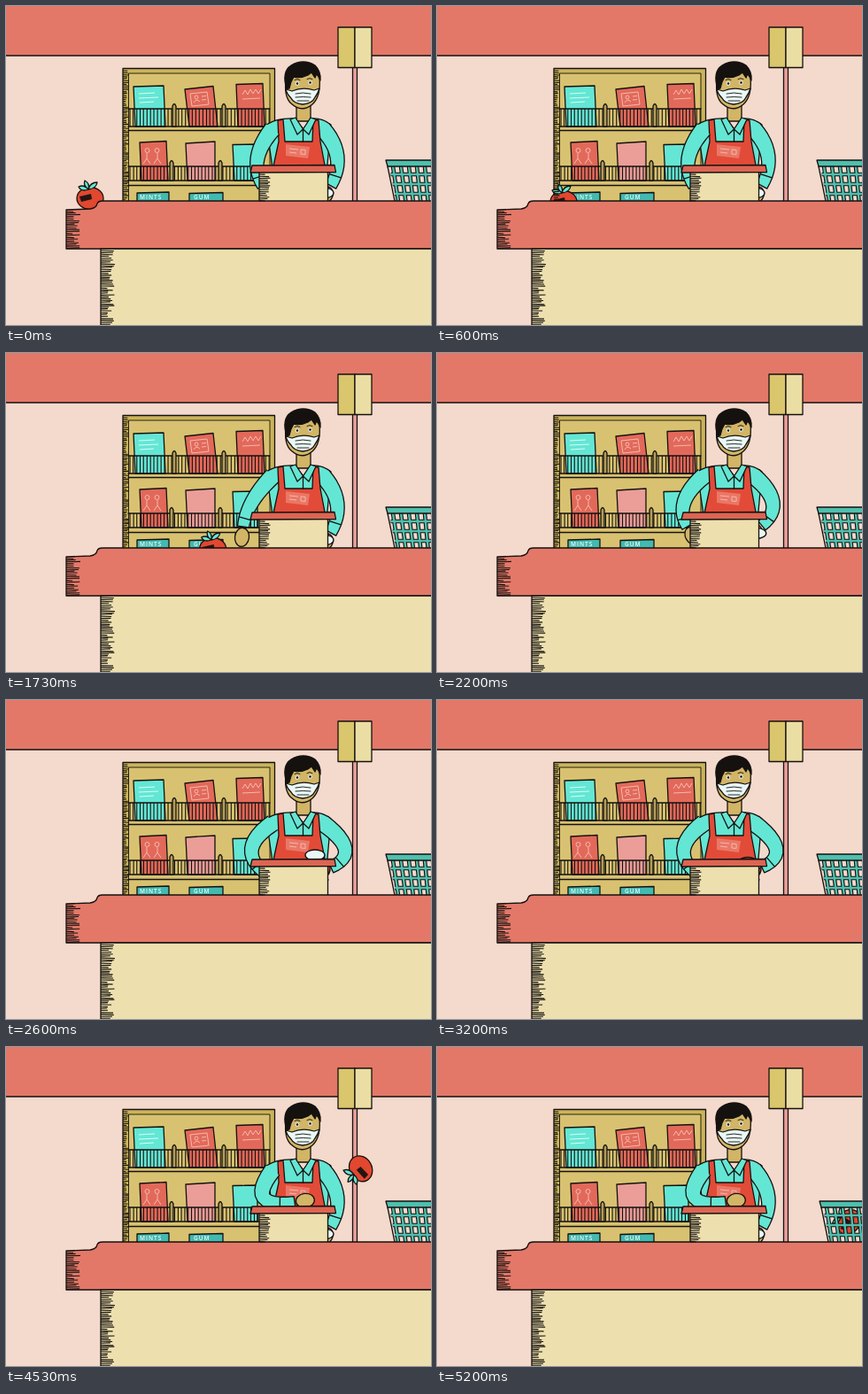
Recreate the animation shown at these times as an HTML page. Size 480 px wide and 360 px high, loop 5990 ms.

```html
<!DOCTYPE html>
<html lang="en">
<head>
<meta charset="utf-8">
<title>Checkout counter</title>
<style>
  html, body { margin: 0; width: 100%; height: 100%; overflow: hidden; background: #f4d9cd; }
  svg { display: block; width: 100vw; height: 100vh; }
  .ink { stroke: #15110f; stroke-width: 1.3; stroke-linejoin: round; stroke-linecap: round; }
  .line { fill: none; }
  .fine { stroke-width: 0.9; }
  .hatch { fill: none; stroke: #15110f; stroke-width: 1.1; }
  .chalk { fill: none; stroke: #f3b9ad; stroke-width: 1; }
  .red { fill: #e37868; }
  .poster { fill: #e2695a; }
  .tan { fill: #d8c271; }
  .cream { fill: #ede0ae; }
  .teal { fill: #64e6d4; }
  .skin { fill: #d2b566; }
  .apple { fill: #e2472f; }
  .apron { fill: #e24b38; }
  .white { fill: #e9f8f6; }
  .sign { font: 600 6.5px "Open Sans", sans-serif; letter-spacing: 1px; fill: #effdf8; }
</style>
</head>
<body>
<svg viewBox="0 0 480 360" preserveAspectRatio="none">
  <rect width="480" height="360" fill="#f4d9cd"/>
  <path class="ink red" d="M-2 -2H482V56H-2Z"/>

  <g id="shelf">
    <path class="ink" fill="#cbb45a" d="M132 70.500H303.500V222H132Z"/>
    <path class="ink tan fine" d="M138.500 222V76H298V222"/>
    <path class="ink teal" d="M144 91L178 90L180 136H146Z"/>
    <path class="ink poster" d="M202 94L234 90.500L239 136H207Z"/>
    <path class="ink poster" d="M260 88.500L290 87.500L292 136H262Z"/>
    <path class="ink poster" d="M151 154L181 152.500L183 197H153Z"/>
    <path class="ink" fill="#eb9d98" d="M203 155L236 153L236 197H205Z"/>
    <path class="ink teal" d="M256 156.500L284 156V197H258Z"/>
    <path class="chalk" style="stroke:#d6fff6" d="M150 99l18-1M150 104l22-1M151 109l16-1"/>
    <path class="chalk" d="M208 99l19-2l2 14l-19 2zM212 109q3-5 7-1M213 103a2 2 0 1 0 4 0a2 2 0 1 0-4 0M221 102l5-.5M221 106l5-.5M267 100l3-5l3 5l3-6l3 5l3-5l3 5l3-5M267 105l20-1"/>
    <path class="chalk" d="M157 163a2.500 2.500 0 1 0 5 0a2.500 2.500 0 1 0-5 0M168 163a2.500 2.500 0 1 0 5 0a2.500 2.500 0 1 0-5 0M159 166v6l-4 6M159 172l4 6M171 166v6l-4 6M171 172l4 6"/>
    <path id="bars" class="hatch"/>
    <path class="ink line" d="M138 116H298M138 136H298M138 140.500H298M138 181H298M138 197H298M138 202.500H298"/>
    <path class="ink" fill="#b39d58" d="M188 136V113q2-5 4 0V136ZM244 136V113q2-5 4 0V136ZM185 197V177q2-5 4 0V197ZM240 197V177q2-5 4 0V197Z"/>
    <path class="ink" fill="#43b9b0" d="M148 211L184 210V222H148ZM207 211.500L245 210.500V222H207Z"/>
    <text class="sign" x="151" y="217.500">MINTS</text>
    <text class="sign" x="212" y="218">GUM</text>
  </g>

  <path class="ink" fill="#e99f9b" d="M391.500 69H396.500V222H391.500Z"/>
  <path class="ink" fill="#dac66c" d="M375 24H394V69.500H375Z"/>
  <path class="ink" fill="#ebdea4" d="M394 24H413V69.500H394Z"/>

  <g id="clerk">
    <path class="ink skin" d="M328 108V130H344V108Z"/>
    <path class="ink teal" d="M326 127Q306 126 294 134L302 190H362L367 134Q357 126 345 127L336 139Z"/>
    <g id="right"><ellipse class="ink skin" rx="10" ry="7.500"/><path class="ink teal"/></g>
    <path class="ink apron" d="M307 129L313 128L315 153H346L347 128L353 129L355 153L362 190H300L308 153Z"/>
    <path fill="#ea7766" d="M316 156L343 159L341 172L316 169Z"/>
    <path class="chalk" d="M320 161l10 1M320 165l8 1M333 162l5 .5v5l-5-.5z"/>
    <path class="ink teal" d="M327 126L335.500 139L329 145L321 128ZM344 126L335.500 139L342 145L350 128Z"/>
    <path class="ink line" d="M335.500 140V153"/>
    <path class="ink skin" d="M316 84Q314 103 322 110Q334 121 346 111Q356 102 354 80Q340 66 322 72Z"/>
    <path class="ink" fill="#15110f" d="M317 94Q311 74 322 67Q336 59 349 67Q356 74 355 84L351 76L349 81L345 75L341 78Q333 82 325 80Q321 86 320 93Z"/>
    <path class="ink line fine" d="M326 83.500q3-2 6 0M340 82.500q3-2 6 0"/>
    <circle class="white" cx="329" cy="87.500" r="2.200"/><circle class="white" cx="343.500" cy="86.500" r="2.200"/>
    <circle cx="329" cy="87.500" r="1.200"/><circle cx="343.500" cy="86.500" r="1.200"/>
    <path class="ink white" d="M316 94L323 96Q335 91 348 95L354 93Q352 99 349 103Q346 110 335 111Q325 110 322 104Q317 99 316 94Z"/>
    <path class="ink line fine" d="M327 99q8-2 17 0M327 103q8-1 17 0M329 107q6 0 13 0"/>
  </g>

  <g id="fruit">
    <ellipse class="ink apple" rx="15" ry="12.500"/>
    <path fill="#241512" d="M-12-2L1-5L2 1L-10 4Z"/>
    <path class="ink teal" d="M-2-10Q-10-7-13-13Q-7-16-2-10ZM-2-10Q-8-14-6-20Q0-17-2-10ZM-2-10Q0-18 8-18Q7-11-2-10Z"/>
  </g>
  <ellipse id="cloth" class="ink white" rx="11" ry="6"/>
  <g id="left"><ellipse class="ink skin" rx="10.500" ry="8"/><path class="ink teal"/></g>

  <path class="ink cream" d="M286 187H363.500V222H286Z"/>
  <path class="ink" fill="#dc6553" d="M278 180L371 179.500L372.500 187.500L276 188Z"/>

  <g id="basket">
    <g class="line">
      <path class="lattice" stroke="#15110f" stroke-width="4.600"/>
      <path class="lattice" stroke="#4fbfae" stroke-width="2.400"/>
    </g>
    <path class="ink line" d="M431 181L439 220"/>
    <path class="ink" fill="#4fbfae" d="M429 174H492V181H431Z"/>
  </g>

  <path class="ink red" d="M68 230L95 229Q102 228 103 223Q104 220 109 220H482V274H68Z"/>
  <path class="ink cream" d="M107 274H482V362H107Z"/>
  <path id="shade" class="hatch"/>
</svg>

<script>
const $ = s => document.querySelector(s);
const LOOP = 5990, FPS = 15, LAST = 5200;
const TOSS = 4270, LAND = 4840;

// Static texture
let seed = 7;
const rand = () => (seed = seed * 16807 % 2147483647) / 2147483647;

function hatch(x, top, bottom, len) {
  let d = '';
  for (let y = top; y < bottom; y += 1.8 + 0.6 * rand())
    d += `M${x} ${y}l${len * (0.45 + 0.55 * rand())} ${rand() - 0.5}`;
  return d;
}
function uprights(top, bottom) {
  let d = '';
  for (let x = 140; x < 298; x += 3.6 + 0.6 * rand()) d += `M${x} ${top}V${bottom}`;
  return d;
}
function lattice() {
  let d = '';
  for (let i = 0; i < 7; i++) d += `M${437 + 9 * i} 181L${443 + 8.4 * i} 220`;
  for (let y = 190; y < 220; y += 11) d += `M${433 + (y - 182) / 5} ${y}H490`;
  return d;
}
$('#bars').setAttribute('d', uprights(116, 136) + uprights(181, 197));
$('#shade').setAttribute('d',
  hatch(68, 232, 274, 16) + hatch(107, 276, 360, 16) +
  hatch(132, 73, 220, 7) + hatch(286, 190, 220, 14));
document.querySelectorAll('.lattice').forEach(p => p.setAttribute('d', lattice()));

// Motion helpers
const ramp = (t, from, to) => Math.min(1, Math.max(0, (t - from) / (to - from)));
const ease = (t, from, to) => { const k = ramp(t, from, to); return k * k * (3 - 2 * k); };
const mix = (a, b, k) => a.map((v, i) => v + (b[i] - v) * k);

const place = (id, [x, y], turn = 0) =>
  $(id).setAttribute('transform', `translate(${x} ${y}) rotate(${turn})`);

// Bent sleeve through shoulder, elbow and wrist; the hand continues the forearm
function arm(id, s, [ex, ey, ...w]) {
  const c = [2 * ex - (s[0] + w[0]) / 2, 2 * ey - (s[1] + w[1]) / 2];
  const outer = [], inner = [];
  for (let i = 0; i <= 12; i++) {
    const u = i / 12;
    const a = mix(s, c, u), b = mix(c, w, u), [x, y] = mix(a, b, u);
    const r = (9.5 - 3 * u) / Math.hypot(b[0] - a[0], b[1] - a[1]);
    const nx = (b[1] - a[1]) * r, ny = (a[0] - b[0]) * r;
    outer.push(`${x + nx} ${y + ny}`);
    inner.unshift(`${x - nx} ${y - ny}`);
  }
  const [hand, sleeve] = $(id).children;
  sleeve.setAttribute('d', `M${outer.concat(inner).join('L')}M${outer[10]}L${inner[2]}`);
  const angle = Math.atan2(w[1] - c[1], w[0] - c[0]);
  hand.setAttribute('transform',
    `translate(${w[0] + 12 * Math.cos(angle)} ${w[1] + 12 * Math.sin(angle)}) rotate(${angle * 180 / Math.PI})`);
}

// Arm poses: elbow x, y, wrist x, y
const LEFT = { rest: [284, 172, 290, 203], reach: [278, 168, 268, 196], work: [280, 168, 293, 196], toss: [291, 170, 326, 175] };
const RIGHT = { rest: [374, 170, 367, 203], work: [383, 168, 367, 189] };
const SPOT = [351, 190], RELEASE = [348, 166];

function moveFruit(t, bump) {
  const belt = [95 + 0.08 * Math.min(t, 1930), 217 + 4 * ramp(t, 0, 600)];
  const carry = ease(t, 1930, 2450);
  const held = mix(mix(belt, SPOT, carry), RELEASE, ease(t, 4070, TOSS));
  const s = Math.max(0, Math.min(t, LAND) - TOSS);
  const flight = [0.2 * s + bump, -0.25 * s + 0.000535 * s * s];
  place('#fruit', [held[0] + flight[0], held[1] + flight[1]], 180 * carry + 0.23 * s);
}

function draw(t) {
  const work = ease(t, 1950, 2400), toss = ease(t, 4070, TOSS);
  const busy = work * (1 - ease(t, 4070, 4330));
  const swing = busy * (0.5 + 0.5 * Math.cos((t - 2600) / 800 * 2 * Math.PI));

  let left = mix(LEFT.rest, LEFT.reach, ease(t, 1000, 1700));
  left = mix(mix(left, LEFT.work, work), LEFT.toss, toss);
  left[0] -= 2.5 * swing;
  arm('#left', [301, 139], left);
  arm('#right', [358, 139], mix(RIGHT.rest, RIGHT.work, busy));
  place('#cloth', [359 + 3 * busy - 13 * swing, 211 - 13 * busy - 23 * swing]);

  const s = Math.max(0, t - LAND);
  const bump = 3 * (1 - Math.exp(-s / 80) * Math.cos(s / 40));
  moveFruit(t, bump);
  place('#basket', [bump, 0]);
}

const start = performance.now();
function tick() {
  const t = (performance.now() - start) % LOOP;
  draw(Math.min(LAST, Math.floor(t * FPS / 1000 + 0.1) * 1000 / FPS));
  requestAnimationFrame(tick);
}
tick();
</script>
</body>
</html>
```
